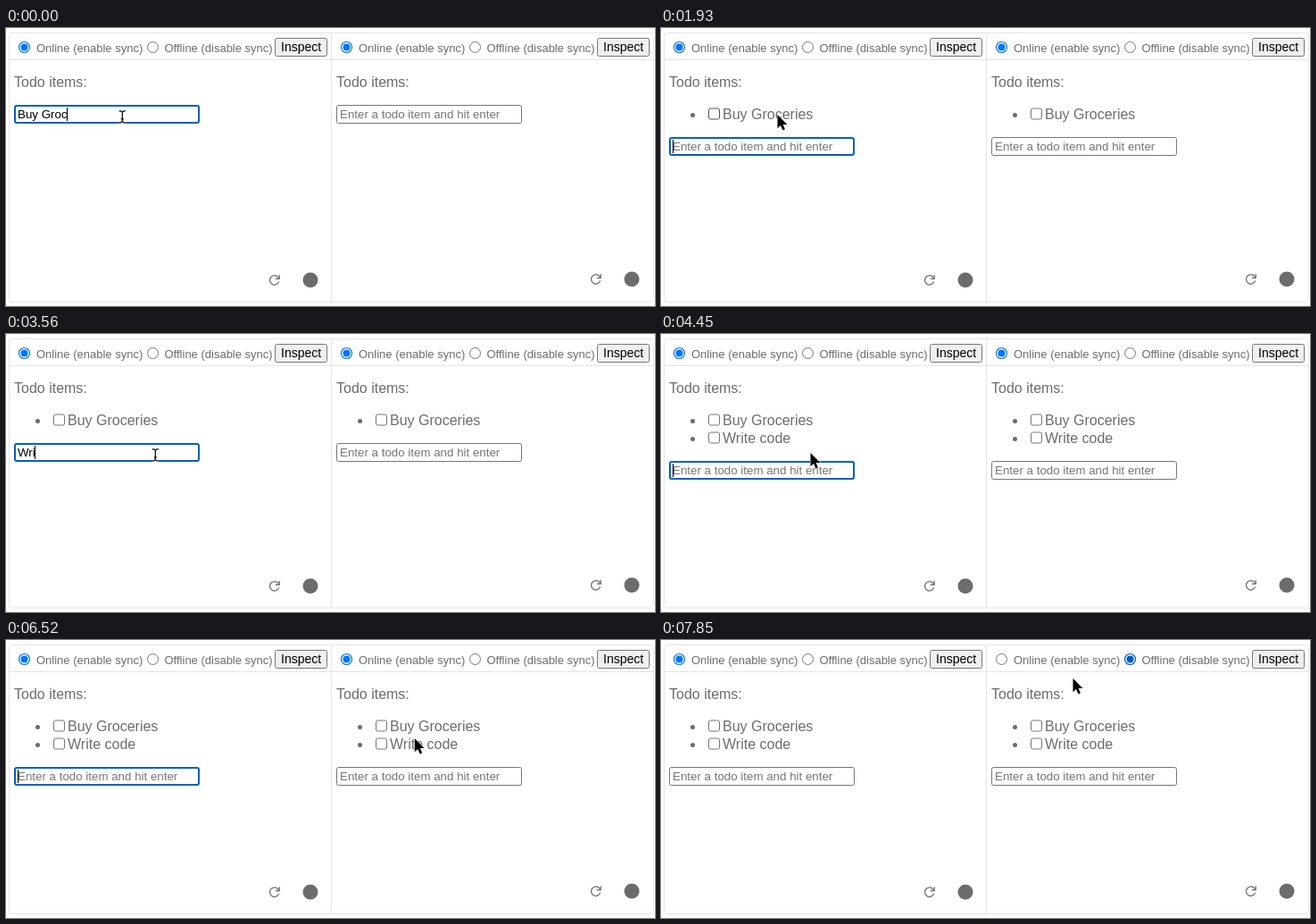
Animation of 727x311 px, one loop 7.99 s. Source, as an HTML page:

```html
<!DOCTYPE html>
<html lang="en">
<head>
<meta charset="utf-8">
<title>Synced todo lists</title>
<style>
html, body { margin: 0; width: 100%; height: 100%; overflow: hidden; background: #fff; }
svg { display: block; font-family: "Liberation Sans", Arial, sans-serif; fill: none; }
</style>
</head>
<body>
<svg id="stage" width="727" height="311" viewBox="0 0 727 311"></svg>
<script>
const LOOP = 7990, TICK = 148.2;
const GRAY = '#6c6c6c', EDGE = '#767676', HOVER = '#4f4f4f', LINE = '#e4e4e4';
const INPUT_FONT = 13.333;
const stage = document.getElementById('stage');
const ruler = document.createElement('canvas').getContext('2d');
ruler.font = INPUT_FONT + 'px "Liberation Sans", Arial, sans-serif';

// Number of characters typed at successive ticks
const FIRST = [8, 9, 9, 10, 10, 11, 12, 13];
const SECOND = [1, 2, 3, 4, 5, 7, 8, 10];
const CARET_OFF = [[10, 13], [17, 20], [32, 35], [39, 42], [46, 49]];
// Pointer stops: tick, x, y
const PATH = [[13, 130.5, 97], [16, 176, 131], [17, 167.5, 133], [35, 167.5, 133],
  [40, 442.5, 132], [42, 442.5, 132], [49, 519.5, 21], [50, 523, 21],
  [52, 523, 21], [53, 461.5, 43]];

const text = (x, y, size, color, s) =>
  `<text x="${x}" y="${y}" font-size="${size}" fill="${color}">${s}</text>`;
const box = (x, y, w, h, r, stroke, width = 1, fill = '#fff') =>
  `<rect x="${x}" y="${y}" width="${w}" height="${h}" rx="${r}" stroke="${stroke}" stroke-width="${width}" fill="${fill}"/>`;
const disc = (x, y, r, fill) => `<circle cx="${x}" cy="${y}" r="${r}" fill="${fill}"/>`;

function radio(x, on, color) {
  return `<circle cx="${x}" cy="21.5" r="6" stroke="${color}" stroke-width="${on ? 1.2 : 1}" fill="#fff"/>`
    + (on ? disc(x, 21.5, 4, color) : '');
}

function item(label, i, hover) {
  const y = 20 * i;
  return disc(35.5, 97.5 + y, 2.5, GRAY)
    + box(53.5, 90 + y, 12, 12, 2, hover ? HOVER : EDGE)
    + text(69, 102 + y, 16, GRAY, label);
}

function input(y, typed, focused, caret) {
  let s = focused ? box(10, y + 1, 206, 19, 2, '#005fcc', 2)
                  : box(9.5, y + .5, 207, 20, 2, EDGE);
  s += typed ? text(13, y + 15, INPUT_FONT, '#000', typed)
             : text(13, y + 15, INPUT_FONT, '#757575', 'Enter a todo item and hit enter');
  if (focused && caret) {
    const x = Math.floor(13 + ruler.measureText(typed).width);
    s += `<rect x="${x}" y="${y + 3}" width="1" height="15" fill="#000"/>`;
  }
  return s;
}

function panel(p) {
  const items = ['Buy Groceries', 'Write code'].slice(0, p.count);
  const inputY = [86, 122, 142][p.count];
  return `<g transform="translate(${p.x})">`
    + radio(20.5, !p.offline, p.offline ? EDGE : '#0075ff')
    + text(34, 27, 13, GRAY, 'Online (enable sync)')
    + radio(164.5, p.offline, p.offline ? '#005cc8' : p.hoverRadio ? HOVER : EDGE)
    + text(177.5, 27, 13, GRAY, 'Offline (disable sync)')
    + box(301.5, 11.5, 58, 20, 2, EDGE, 1, '#efefef')
    + text(308, 26, 14, '#000', 'Inspect')
    + text(9, 66, 16, GRAY, 'Todo items:')
    + items.map((s, i) => item(s, i, p.hoverItem && !i)).join('')
    + input(inputY, p.typed || '', p.focused, p.caret)
    + '</g>';
}

function icons(dx, dy) {
  return `<g transform="translate(${dx} ${dy})">
    <path d="M305.4 279.8A5.2 5.2 0 1 0 305.7 283.6M306.2 276.2V280.6H301.8" stroke="${GRAY}" stroke-width="1.3"/>
    ${disc(341, 282, 8.5, GRAY)}</g>`;
}

function pointerAt(k) {
  const next = PATH.findIndex(p => p[0] > k);
  if (next < 0) return PATH[PATH.length - 1].slice(1);
  if (!next) return PATH[0].slice(1);
  const [a, ax, ay] = PATH[next - 1], [b, bx, by] = PATH[next];
  const u = (k - a) / (b - a), e = u * u * (3 - 2 * u);
  return [ax + (bx - ax) * e, ay + (by - ay) * e];
}

function pointer(k) {
  const [x, y] = pointerAt(k);
  const beam = k < 8 || (k >= 16 && k < 30);
  const d = 'M-3.5 -6.5H-1.5L0 -5L1.5 -6.5H3.5M0 -5V5M-3.5 6.5H-1.5L0 5L1.5 6.5H3.5M-1.5 2.5H1.5';
  return beam
    ? `<g transform="translate(${x - .2} ${y + 2.3})"><path d="${d}" stroke="#fff" stroke-width="2.6"/><path d="${d}" stroke="#000" stroke-width="1.2"/></g>`
    : `<path transform="translate(${x} ${y})" d="M0 0V15.2L3.5 12L5.9 17.4L8.4 16.3L6.1 11H10.8Z" fill="#000" stroke="#fff" stroke-width="1" paint-order="stroke"/>`;
}

function draw(k) {
  const typed = k < 8 ? 'Buy Groceries'.slice(0, FIRST[k])
    : k >= 22 && k < 30 ? 'Write code'.slice(0, SECOND[k - 22]) : '';
  const left = {
    x: 0, typed, count: k < 8 ? 0 : k < 30 ? 1 : 2, focused: k < 51,
    caret: !CARET_OFF.some(([a, b]) => k >= a && k < b),
    hoverItem: k >= 9 && k < 14
  };
  const right = {
    x: 361, count: k < 9 ? 0 : k < 30 ? 1 : 2,
    offline: k >= 51, hoverRadio: k >= 49
  };
  stage.innerHTML = box(3.5, 5.5, 722, 301, 3, LINE)
    + `<path d="M4 35.5H725M364.5 6V306" stroke="${LINE}"/>`
    + panel(left) + panel(right) + icons(0, 0) + icons(360, -1) + pointer(k);
}

let start, shown = -1;
function frame(now) {
  start ??= now;
  const k = Math.floor(((now - start) % LOOP + 9) / TICK);
  if (k !== shown) draw(shown = k);
  requestAnimationFrame(frame);
}
draw(0);
requestAnimationFrame(frame);
</script>
</body>
</html>
```
